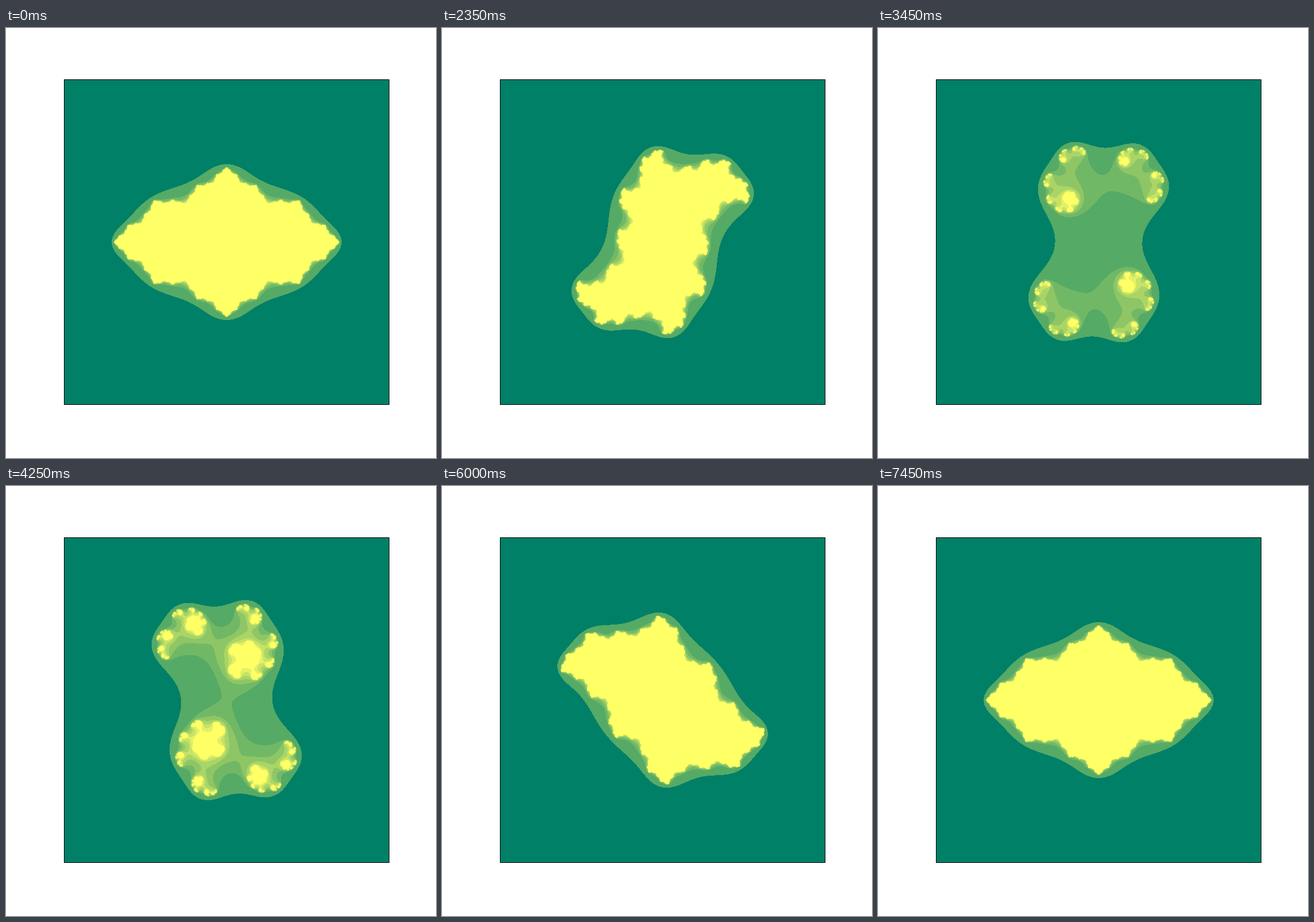
Animation of 720 by 720 pixels, one loop 7500 ms. Source, as an HTML page with a canvas:

```html
<!DOCTYPE html>
<html lang="en">
<head>
<meta charset="utf-8">
<title>Julia set</title>
<style>
  html, body { margin: 0; width: 100%; height: 100%; overflow: hidden; background: #fff; }
  canvas { display: block; width: 720px; height: 720px; }
</style>
</head>
<body>
<canvas id="stage" width="720" height="720"></canvas>
<script>
const STEP = 50, STEPS = 150;
const RADIUS = 0.54;          // size of the circle that c runs along
const UNIT = 136;             // pixels per unit of the complex plane
const BOX = { x: 97, y: 86, size: 545 };
const CX = 369, CY = 358;     // pixel at the origin
const HALF_W = 198, HALF_H = 174;
const LIMIT = 10, LEVELS = 9;

const ctx = document.getElementById("stage").getContext("2d");
const w = 2 * HALF_W + 1, h = 2 * HALF_H + 1;
const image = ctx.createImageData(w, h);
const pixels = new Uint32Array(image.data.buffer);

// Green to yellow, packed as ABGR
const palette = Array.from({ length: LEVELS + 1 }, (_, i) => {
  const v = i / LEVELS;
  const r = Math.round(255 * v), g = Math.round(127.5 + 127.5 * v);
  return ((255 << 24) | (102 << 16) | (g << 8) | r) >>> 0;
});

// The first escapes share the background, the next two share one band
function level(x, y, cr, ci) {
  for (let n = 1; n <= LIMIT; n++) {
    const re = x * x - y * y + cr;
    y = 2 * x * y + ci;
    x = re;
    if (x * x + y * y > 4) return n <= 3 ? 0 : Math.max(3, n - 2);
  }
  return LEVELS;
}

function draw(step) {
  const a = 2 * Math.PI * step / (STEPS - 1);
  const cr = -RADIUS * Math.cos(a), ci = -RADIUS * Math.sin(a);
  const last = pixels.length - 1;
  // The set is symmetric under z -> -z, so half of it is enough
  for (let i = 0; i <= last / 2; i++) {
    const x = (i % w - HALF_W) / UNIT;
    const y = (HALF_H - Math.floor(i / w)) / UNIT;
    pixels[i] = pixels[last - i] = palette[level(x, y, cr, ci)];
  }
  ctx.putImageData(image, CX - HALF_W, CY - HALF_H);
}

ctx.fillStyle = "#fff";
ctx.fillRect(0, 0, 720, 720);
ctx.fillStyle = "rgb(0,128,102)";
ctx.fillRect(BOX.x, BOX.y, BOX.size, BOX.size);
ctx.strokeStyle = "#000";
ctx.lineWidth = 1;
ctx.strokeRect(BOX.x + 0.5, BOX.y + 0.5, BOX.size - 1, BOX.size - 1);

const start = performance.now();
let shown = -1;
function tick() {
  const step = Math.floor((performance.now() - start) / STEP) % STEPS;
  if (step !== shown) draw(shown = step);
  requestAnimationFrame(tick);
}
tick();
</script>
</body>
</html>
```
